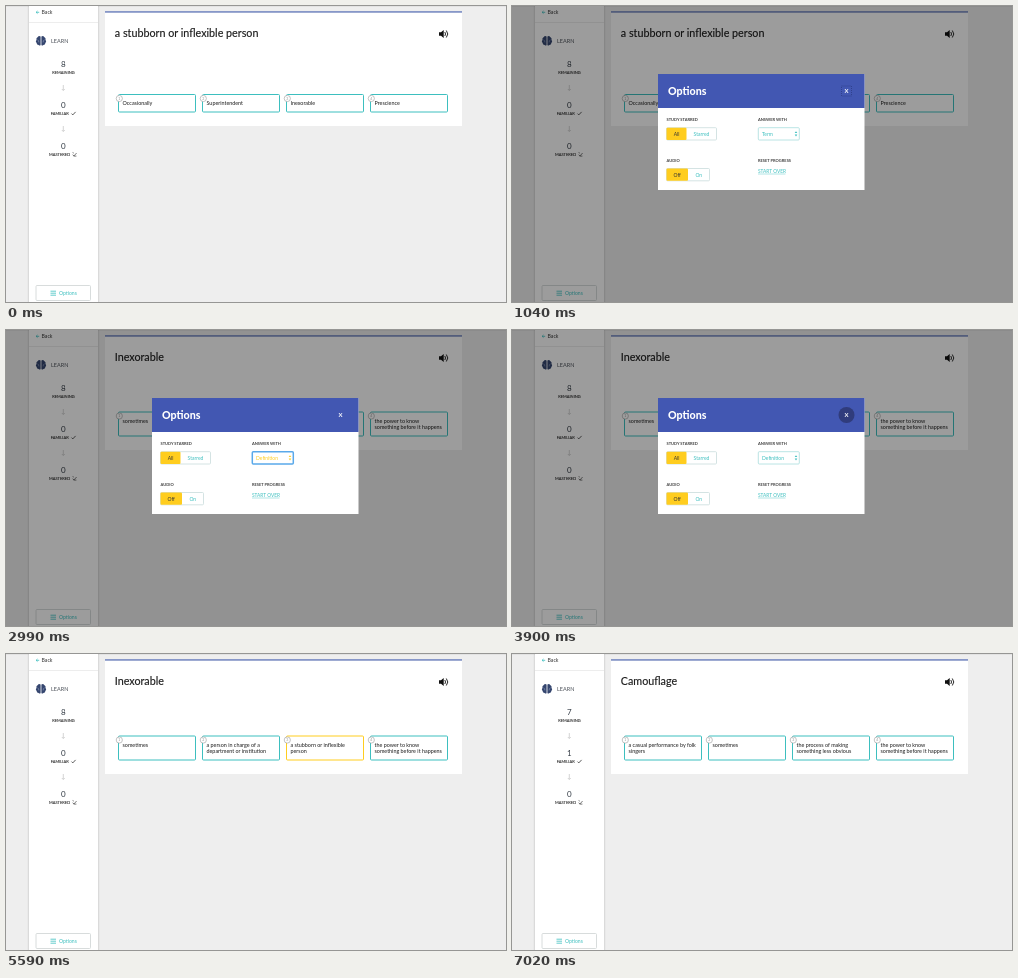
An HTML page that plays this animation: 500x296 px, repeating every 8000 ms.

```html
<!DOCTYPE html>
<html lang="en">
<head>
<meta charset="utf-8">
<title>Study session</title>
<style>
html, body { margin: 0; width: 100%; height: 100%; overflow: hidden; background: #eee; }
svg { display: block; width: 500px; height: 296px; font-family: Lato, "Open Sans", sans-serif; }
</style>
</head>
<body>
<svg id="stage" viewBox="0 0 500 296" xmlns="http://www.w3.org/2000/svg"></svg>
<script>
const LOOP = 8000;
const TEAL = '#3dbfbf', YELLOW = '#ffcd1f', GREEN = '#23b26d', INK = '#1c1c1c';

const rect = (x, y, w, h, fill, extra = '') =>
  `<rect x="${x}" y="${y}" width="${w}" height="${h}" fill="${fill}" ${extra}/>`;
const box = (x, y, w, h, stroke, fill = '#fff', line = 1) =>
  rect(x, y, w, h, fill, `rx="1" stroke="${stroke}" stroke-width="${line}"`);
const text = (x, y, size, str, fill = INK, extra = '') =>
  `<text x="${x}" y="${y}" font-size="${size}" fill="${fill}" ${extra}>${str}</text>`;
const mid = (x, y, size, str, fill = INK, extra = '') =>
  text(x, y, size, str, fill, `text-anchor="middle" ${extra}`);
const path = (d, stroke, line = 1, fill = 'none', extra = '') =>
  `<path d="${d}" stroke="${stroke}" stroke-width="${line}" fill="${fill}" ${extra}/>`;
const BOLD = 'font-weight="700"';

const questions = {
  define: {
    title: 'a stubborn or inflexible person', top: 88.5, left: 8, known: 0,
    answers: ['Occasionally', 'Superintendent', 'Inexorable', 'Prescience']
  },
  term: {
    title: 'Inexorable', top: 82, left: 8, known: 0,
    answers: ['sometimes', 'a person in charge of a|department or institution',
      'a stubborn or inflexible|person', 'the power to know|something before it happens']
  },
  next: {
    title: 'Camouflage', top: 82, left: 7, known: 1,
    answers: ['a casual performance by folk|singers', 'sometimes',
      'the process of making|something less obvious', 'the power to know|something before it happens']
  }
};

// Each entry overrides the state that came before it.
const timeline = [
  [0, { q: 'define', modal: false, pick: null, optionsHover: false,
        select: 'Term', focus: false, xFocus: false, xHover: false }],
  [650, { optionsHover: true }],
  [1040, { modal: true, optionsHover: false, xFocus: true }],
  [1950, { focus: true, xFocus: false }],
  [2990, { q: 'term', select: 'Definition' }],
  [3510, { focus: false }],
  [3900, { xHover: true }],
  [4030, { modal: false, pick: YELLOW }],
  [5980, { pick: GREEN }],
  [7020, { q: 'next', pick: null }]
];

function counter(y, n, label, labelX) {
  return mid(57.3, y, 8, n, '#333b45') + mid(labelX, y + 7.5, 4, label, '#333', 'stroke="#333" stroke-width=".1"');
}

const downArrow = y => path(`M57.3 ${y}v5.5m-1.5-1.5l1.5 1.5l1.5-1.5`, '#c9c9c9', .8);

const brain = `<g transform="translate(35 35)">
  <path d="M-.4-4.5Q-2.2-5.6-3.2-3.9Q-5.2-3-4.5-1.2Q-5.9.6-4.4 2Q-4.2 4-2.4 4Q-1.2 5.2-.4 4Z
    M.4-4.5Q2.2-5.6 3.2-3.9Q5.2-3 4.5-1.2Q5.9.6 4.4 2Q4.2 4 2.4 4Q1.2 5.2.4 4Z" fill="#35466f"/>
  ${path('M-3.4-1.3Q-2-.2-2.2 1.4M3.4-1.3Q2-.2 2.2 1.4', '#93a0c0', .6)}</g>`;

function sidebar(q, hover) {
  const accent = hover ? YELLOW : TEAL;
  return rect(23, -5, 69, 310, '#fff', 'filter="url(#shade)"') +
    path('M33.2 6.3h-3m1.3-1.3l-1.4 1.3l1.4 1.3', TEAL, .8) +
    text(35.5, 8.2, 5.2, 'Back', '#333') +
    rect(23, 16, 69, .7, '#e6e6e6') +
    brain + text(45, 37, 5.5, 'LEARN', '#4a4f57') +
    counter(60.5, q.left, 'REMAINING', 57.5) + downArrow(79) +
    counter(101.5, q.known, 'FAMILIAR', 53.7) +
    path('M65.5 107.6l1.3 1.3l2.8-3', '#333', .8) + downArrow(120) +
    counter(142.5, 0, 'MASTERED', 53.6) +
    path('M66.7 148.7l1.2 1.3l2.7-3m-2.8.1l-1.2-.6m1 3.6l2.8 0', '#444', .7) +
    box(30, 279.5, 54.5, 15, hover ? YELLOW : '#cfd3d3', '#fff', .8) +
    path('M44.5 285.2h5.5M44.5 287.2h5.5M44.5 289.2h5.5', accent, .8) +
    text(53, 289.1, 5.1, 'Options', accent);
}

function answer(str, i, q, pick) {
  const x = 112.5 + 84 * i;
  const lines = str.split('|');
  const first = q.top > 85 ? q.top + 10.5 : q.top + 10.8;
  return box(x, q.top, 77, 106 - q.top, i === 2 && pick || TEAL) +
    `<circle cx="${x + .8}" cy="${q.top + 4}" r="3.1" fill="#fff" stroke="#aaa" stroke-width=".7"/>` +
    mid(x + .8, q.top + 5.3, 3.6, i + 1, '#999') +
    lines.map((line, n) => text(x + 4, first + n * 6.6, 5.4, line)).join('');
}

function card(q, pick) {
  return rect(99, 5, 357, 115, '#fff') + rect(99, 5, 357, 1.8, '#8797c8') +
    text(108.8, 31, 10.75, q.title, INK, 'stroke="#1c1c1c" stroke-width=".15"') +
    path('M433 26.3h2l2.7-2.4v8.2l-2.7-2.4h-2z', 'none', 0, '#111') +
    path('M438.8 26q1.5 2 0 4M440.3 24.5q3 3.5 0 7', '#111', .9) +
    q.answers.map((a, i) => answer(a, i, q, pick)).join('');
}

function toggle(y, w, split, on, off) {
  return box(154.5, y, w, 12.3, '#c9dcdc', '#fff', .8) +
    rect(154.5, y, split, 12.3, YELLOW, 'rx="1"') +
    mid(154.5 + split / 2, y + 8, 5, on, '#333') +
    mid(154.5 + (split + w) / 2, y + 8, 5, off, TEAL);
}

function modal(s) {
  const ring = s.focus ? '#5aa9ea' : '#a9dede';
  const accent = s.focus ? YELLOW : TEAL;
  const head = (x, y, str) => text(x, y, 4, str, '#3a3a3a', BOLD);
  return rect(0, 0, 500, 296, '#000', 'opacity=".39"') +
    rect(146, 68, 206.5, 116, '#fff') + rect(146, 68, 206.5, 34, '#4257b2') +
    text(156, 89, 10.7, 'Options', '#fff', 'font-weight="800"') +
    (s.xHover ? '<circle cx="334.5" cy="85" r="8" fill="#303c7c"/>' : '') +
    (s.xFocus ? rect(329.5, 80, 10, 10, 'none', 'stroke="#2c3b86" stroke-width=".8" stroke-dasharray="1 1"') : '') +
    mid(334.5, 87.2, 6, 'X', '#fff', BOLD) +
    head(154.5, 115, 'STUDY STARRED') + toggle(121.7, 50, 20, 'All', 'Starred') +
    head(154.5, 156, 'AUDIO') + toggle(162.5, 43, 21.5, 'Off', 'On') +
    head(246, 115, 'ANSWER WITH') +
    box(246.3, 121.7, 41, 12.3, ring, '#fff', s.focus ? 1.5 : .8) +
    text(250, 129.7, 5, s.select, accent) +
    path('M282.7 127l1.3-1.8l1.3 1.8zM282.7 128.6l1.3 1.8l1.3-1.8z', 'none', 0, accent) +
    head(246, 156, 'RESET PROGRESS') +
    text(246, 167, 4.8, 'START OVER', TEAL) + rect(246, 167.8, 27.5, .4, TEAL);
}

const defs = `<defs><filter id="shade" x="-20%" width="140%">
  <feDropShadow dx="0" dy="0" stdDeviation="1.3" flood-color="#000" flood-opacity=".25"/></filter></defs>`;

function draw(s) {
  const q = questions[s.q];
  return defs + rect(0, 0, 500, 296, '#eee') + rect(0, 0, 500, 1, '#e3e3e3') +
    sidebar(q, s.optionsHover) + card(q, s.pick) + (s.modal ? modal(s) : '');
}

const stage = document.getElementById('stage');
const start = performance.now();
let shown = 0;

function tick() {
  const t = (performance.now() - start) % LOOP;
  const past = timeline.filter(([at]) => at <= t);
  if (past.length !== shown) {
    shown = past.length;
    stage.innerHTML = draw(Object.assign({}, ...past.map(p => p[1])));
  }
  requestAnimationFrame(tick);
}
tick();
</script>
</body>
</html>
```
